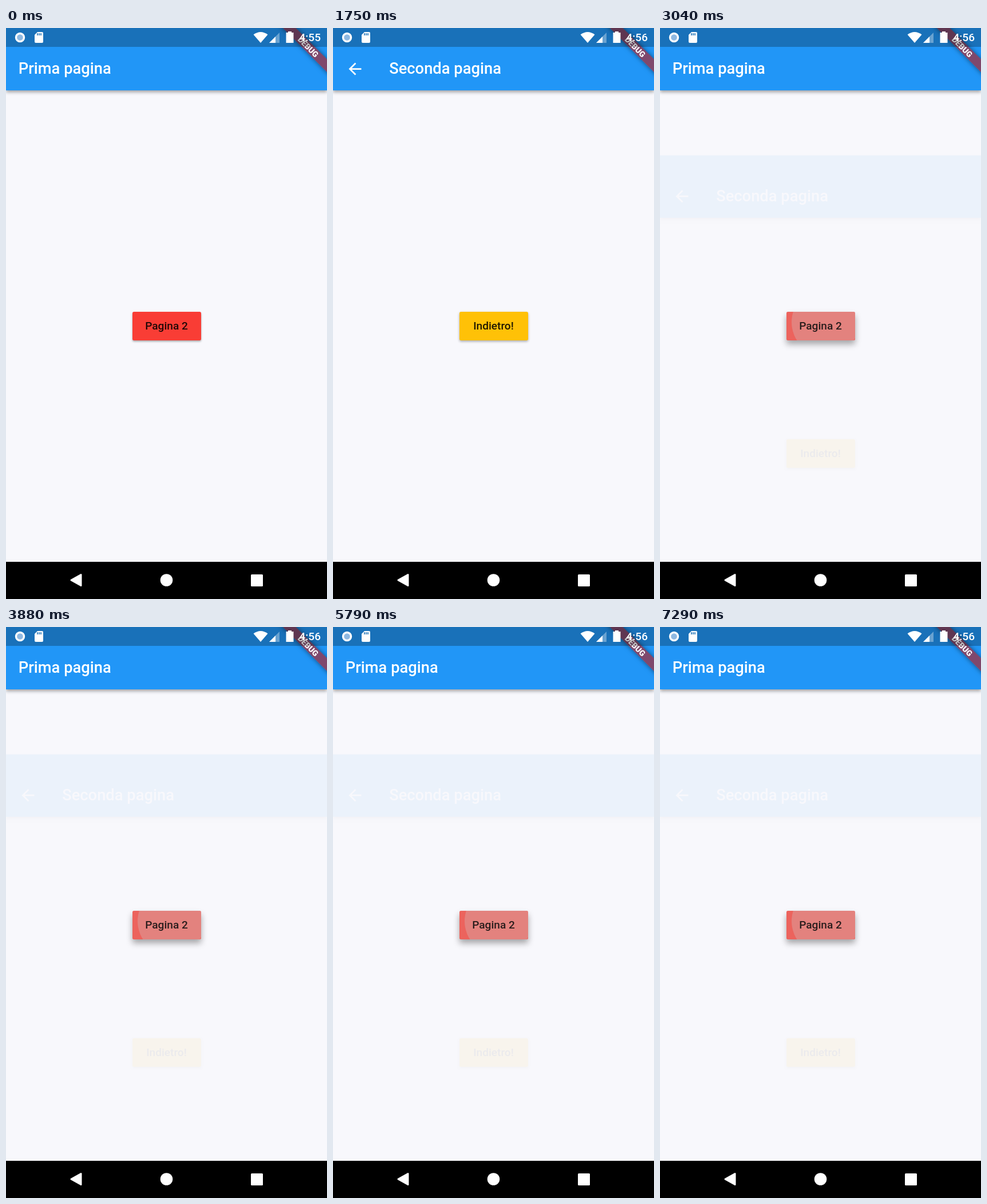
An HTML page that plays this animation: 561x998 px, repeating every 7.33 s.

```html
<!DOCTYPE html>
<html lang="it">
<head>
<meta charset="utf-8">
<title>Prima pagina</title>
<style>
html, body { margin: 0; width: 100%; height: 100%; overflow: hidden; background: #000; }
#stage {
  position: relative; width: 561px; height: 998px; overflow: hidden;
  background: #f8f8fc; font: 500 19.1px Roboto, sans-serif;
}
.page { position: absolute; inset: 0; background: #f8f8fc; }
.bar {
  position: absolute; left: 0; top: 0; width: 561px; height: 109px;
  background: #2196f7; color: #fff; box-shadow: 0 3px 6px rgba(0, 0, 0, .36);
}
.title {
  position: absolute; left: 21.8px; top: 33px; line-height: 77px;
  font-size: 27.3px; white-space: nowrap;
}
#second .title { left: 98.2px; }
.bar svg { position: absolute; left: 22px; top: 55px; }
.button {
  position: absolute; left: 220.5px; top: 496px; width: 120px; height: 49.5px;
  border-radius: 2.7px; box-shadow: 0 2px 4px rgba(0, 0, 0, .32);
  text-align: center; line-height: 50px; color: rgba(0, 0, 0, .87);
}
.red { background: #f93d35; }
.amber { background: #ffc107; }
.ink { position: absolute; inset: 0; overflow: hidden; border-radius: inherit; }
#glow { position: absolute; inset: 0; background: #bcbcbc; }
#splash { position: absolute; border-radius: 50%; background: #c8c8c8; }
.button span { position: relative; }
#banner {
  position: absolute; left: 451.8px; top: 24.6px; width: 152px; height: 16.4px;
  transform: rotate(45deg); background: rgba(183, 28, 28, .63);
  box-shadow: 0 0 8px rgba(0, 0, 0, .5);
  color: #fff; font-size: 13.9px; font-weight: 900; line-height: 16.4px; text-align: center;
}
#status { position: absolute; left: 0; top: 0; width: 561px; height: 33px; background: rgba(0, 0, 0, .25); }
#clock { position: absolute; right: 11px; top: 0; line-height: 34px; color: #fff; }
#nav { position: absolute; left: 0; top: 933px; width: 561px; height: 65px; background: #000; }
svg { display: block; }
</style>
</head>
<body>
<div id="stage">
  <div class="page" id="first">
    <div class="bar"><div class="title">Prima pagina</div></div>
    <div class="button red" id="go">
      <div class="ink"><div id="glow"></div><div id="splash"></div></div>
      <span>Pagina 2</span>
    </div>
  </div>
  <div class="page" id="second">
    <div class="bar">
      <svg width="33" height="33" viewBox="0 0 24 24"><path fill="#fff" d="M20 11H7.8l5.6-5.6L12 4l-8 8 8 8 1.4-1.4L7.8 13H20z"/></svg>
      <div class="title">Seconda pagina</div>
    </div>
    <div class="button amber"><span>Indietro!</span></div>
  </div>
  <div id="banner">DEBUG</div>
  <div id="status">
    <svg width="561" height="33" fill="#fff">
      <circle cx="24.5" cy="16.5" r="7" fill="#8fb9e2" stroke="#fff" stroke-width="3.4"/>
      <path d="M55 7h8q2 0 2 2v15q0 2-2 2H52q-2 0-2-2V12z"/>
      <path d="M55 9v4m3-4v4m3-4v4" stroke="#1970b6" stroke-width="1.6"/>
      <path d="M432.500 11.500Q445 2.500 457.500 11.500L445 26z"/>
      <path d="M478 8v18H460z" opacity=".35"/>
      <path d="M471 15v11H460z"/>
      <path d="M493 8v-2h6v2h3.500v18h-13V8z"/>
    </svg>
    <div id="clock">4:55</div>
  </div>
  <div id="nav">
    <svg width="561" height="65" fill="#fff" stroke="#fff" stroke-linejoin="round">
      <path d="M114 32L131 22.500V41.500z" stroke-width="3"/>
      <circle cx="280.500" cy="32" r="10.800" stroke="none"/>
      <rect x="429.500" y="23.500" width="18" height="18" stroke-width="3"/>
    </svg>
  </div>
</div>
<script>
const LOOP = 7330, SLIDE = 300, RISE = 249.5;
const PRESS = 150, FADE = 200;
// Each visit to the second page: when it opens and when it closes.
const visits = [[736, 2113], [2986, 3440], [3826, 4900], [5736, 6520], [7236, 9999]];

const $ = id => document.getElementById(id);
const clamp = v => Math.min(1, Math.max(0, v));

function bezier(x1, y1, x2, y2) {
  const at = (s, a, b) => 3 * s * (1 - s) ** 2 * a + 3 * s * s * (1 - s) * b + s ** 3;
  return x => {
    let lo = 0, hi = 1;
    for (let i = 0; i < 24; i++) {
      const mid = (lo + hi) / 2;
      if (at(mid, x1, x2) < x) lo = mid; else hi = mid;
    }
    return at(lo, y1, y2);
  };
}
const slideCurve = bezier(.4, 0, .2, 1);
const fadeCurve = bezier(.42, 0, 1, 1);

function drawSecond(p) {
  const page = $('second');
  page.style.visibility = p > 0 ? 'visible' : 'hidden';
  page.style.opacity = p < 1 ? fadeCurve(p) : 1;
  page.style.transform = `translateY(${p < 1 ? RISE * (1 - slideCurve(p)) : 0}px)`;
}

// since: time from the opening of the page; the finger goes down before it.
function drawPress(since) {
  const down = clamp((since + PRESS) / 100);
  const up = clamp((since - 30) / FADE);
  const force = down * (1 - up);
  const r = 58.6 * Math.min(1.25, Math.max(0, (since + PRESS) / (PRESS + 54)));
  const lift = 2 + 5 * force;
  $('go').style.boxShadow = `0 ${lift}px ${lift * 1.7}px rgba(0,0,0,${.32 + .04 * force})`;
  $('glow').style.opacity = .26 * force;
  Object.assign($('splash').style, {
    left: 68.5 - r + 'px', top: 18 - r + 'px',
    width: 2 * r + 'px', height: 2 * r + 'px', opacity: .34 * force
  });
}

function draw(t) {
  let shown = 0, since = -LOOP, clock = '4:55';
  for (const [open, close] of visits) {
    if (t < open - PRESS) break;
    since = t - open;
    shown = t < close ? clamp(since / SLIDE) : 1 - clamp((t - close) / SLIDE);
    clock = t < close ? '4:56' : '4:59';
  }
  drawSecond(shown);
  drawPress(since);
  $('clock').textContent = clock;
}

const start = performance.now();
function tick() {
  draw((performance.now() - start) % LOOP);
  requestAnimationFrame(tick);
}
tick();
</script>
</body>
</html>
```
